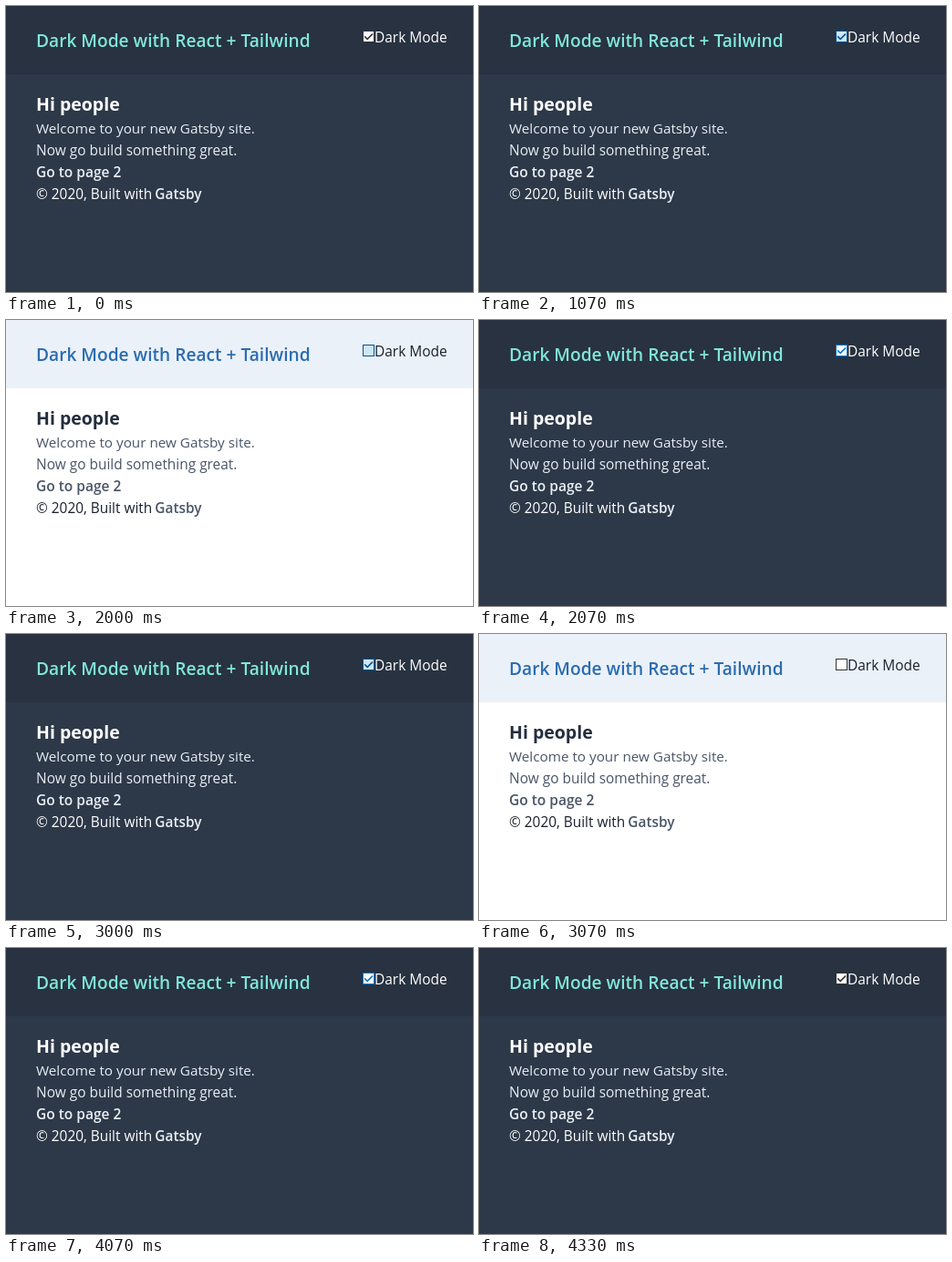
Animation, 512 px wide and 314 px high, one loop 5470 ms. Source, as an HTML page with a canvas:

```html
<!DOCTYPE html>
<html lang="en">
<head>
<meta charset="utf-8">
<title>Dark Mode</title>
<style>
  html, body { margin: 0; width: 100%; height: 100%; overflow: hidden; }
  canvas { display: block; width: 512px; height: 314px; }
</style>
</head>
<body>
<canvas id="stage" width="512" height="314"></canvas>
<script>
const ctx = document.getElementById('stage').getContext('2d', { alpha: false });
const LOOP = 5470;

const THEMES = {
  dark: {
    page: '#2d3848', header: '#283240', title: '#81e6d9',
    heading: '#ffffff', body: '#e8eef5', plain: '#ffffff'
  },
  light: {
    page: '#ffffff', header: '#ebf1f9', title: '#2b6cb0',
    heading: '#242e3f', body: '#4a5568', plain: '#1a202c'
  }
};

const BOXES = {
  idle: { line: '#333333', fill: '#ffffff' },
  hover: { line: '#0078d7', fill: '#ffffff' },
  pressed: { line: '#005499', fill: '#cce8f7' }
};

// start time, theme, checkbox state
const STEPS = [
  [0, 'dark', 'idle'],
  [530, 'dark', 'hover'],
  [1070, 'dark', 'pressed'],
  [1130, 'light', 'idle'],
  [2000, 'light', 'pressed'],
  [2070, 'dark', 'hover'],
  [3000, 'dark', 'pressed'],
  [3070, 'light', 'idle'],
  [4000, 'light', 'pressed'],
  [4070, 'dark', 'hover'],
  [4330, 'dark', 'idle']
];

// text, x, baseline, size, weight, theme colour
const TEXTS = [
  ['Dark Mode with React + Tailwind', 33, 45, 19.15, 600, 'title'],
  ['Dark Mode', 404, 40, 15.45, 400, 'plain'],
  ['Hi people', 33, 115, 19.5, 700, 'heading'],
  ['Welcome to your new Gatsby site.', 33, 140, 15.25, 400, 'body'],
  ['Now go build something great.', 33, 164, 15.45, 400, 'body'],
  ['Go to page 2', 33, 188, 15.5, 600, 'body'],
  ['© 2020, Built with', 33, 212, 15.4, 400, 'plain'],
  ['Gatsby', 163.3, 212, 15.4, 600, 'body']
];

function rect(x, y, w, h, color) {
  ctx.fillStyle = color;
  ctx.fillRect(x, y, w, h);
}

function drawCheckbox({ line, fill }, checked) {
  rect(391, 27, 13, 13, line);
  rect(392, 28, 11, 11, fill);
  if (!checked) return;
  ctx.strokeStyle = line;
  ctx.lineWidth = 1.5;
  ctx.beginPath();
  ctx.moveTo(393.2, 33.4);
  ctx.lineTo(396.2, 36.4);
  ctx.lineTo(402, 30.6);
  ctx.stroke();
}

function draw(time) {
  const [, mode, box] = STEPS.findLast(([start]) => start <= time);
  const theme = THEMES[mode];
  rect(0, 0, 512, 314, theme.page);
  rect(0, 0, 512, 75, theme.header);
  drawCheckbox(BOXES[box], mode === 'dark');
  for (const [text, x, y, size, weight, color] of TEXTS) {
    ctx.font = `${weight} ${size}px "Open Sans", "Noto Sans", sans-serif`;
    ctx.fillStyle = theme[color];
    ctx.fillText(text, x, y);
  }
}

const begin = performance.now();
function tick() {
  draw((performance.now() - begin) % LOOP);
  requestAnimationFrame(tick);
}
tick();
</script>
</body>
</html>
```
